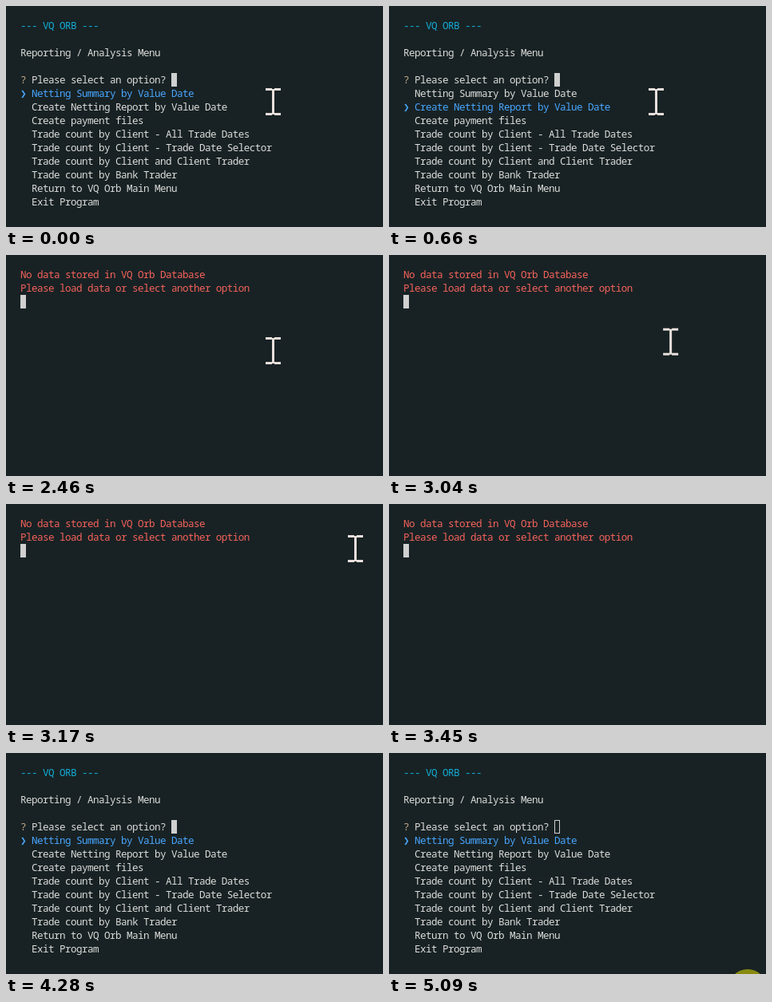
Recreate the animation shown at these times as an HTML page. Size 472 by 277 pixels, loop 5.17 s.

```html
<!DOCTYPE html>
<html lang="en">
<head>
<meta charset="utf-8">
<title>Terminal menu</title>
<style>
  html, body { margin: 0; width: 100%; height: 100%; overflow: hidden; background: #182224; }
  svg { display: block; width: 472px; height: 277px; }
  text {
    font: 500 12.6px "Noto Sans Mono", "DejaVu Sans Mono", monospace;
    letter-spacing: -0.56px; fill: #dcdcda; white-space: pre;
  }
  .head { fill: #13aed8; }
  .error { fill: #f5625c; }
  .active { fill: #48a6ff; }
  .mark { fill: #c6aa8c; }
</style>
</head>
<body>
<svg id="stage" viewBox="0 0 472 277">
  <rect width="472" height="277" fill="#182224"/>
  <g id="header"></g>
  <g id="menu"></g>
  <g id="errors"></g>
  <rect id="caret" width="7" height="17"/>
  <circle id="click" cx="449" cy="295" r="24" fill="#888a10"/>
  <path id="mouse" fill="#e8dfdc"
    d="M-9.5 -17h8v1h3v-1h8v3h-8v28h8v3h-8v-1h-3v1h-8v-3h8v-28h-8z"/>
</svg>
<script>
const LOOP = 5170, LEFT = 18, TOP = 16, CHAR = 7, LINE = 17;
const $ = id => document.getElementById(id);
const show = (el, on) => { el.style.display = on ? '' : 'none'; };

function write(parent, row, col, str, cls = '') {
  const el = document.createElementNS('http://www.w3.org/2000/svg', 'text');
  el.setAttribute('x', LEFT + col * CHAR);
  el.setAttribute('y', TOP + row * LINE + 13);
  el.setAttribute('class', cls);
  el.textContent = str;
  return parent.appendChild(el);
}

write($('header'), 0, 0, '--- VQ ORB ---', 'head');
write($('header'), 2, 0, 'Reporting / Analysis Menu');

write($('menu'), 4, 0, '?', 'mark');
write($('menu'), 4, 2, 'Please select an option?');
const options = [
  'Netting Summary by Value Date',
  'Create Netting Report by Value Date',
  'Create payment files',
  'Trade count by Client - All Trade Dates',
  'Trade count by Client - Trade Date Selector',
  'Trade count by Client and Client Trader',
  'Trade count by Bank Trader',
  'Return to VQ Orb Main Menu',
  'Exit Program'
].map((label, i) => write($('menu'), 5 + i, 2, label));
const pointers = [0, 1].map(i => write($('menu'), 5 + i, 0, '❯', 'active'));

write($('errors'), 0, 0, 'No data stored in VQ Orb Database', 'error');
write($('errors'), 1, 0, 'Please load data or select another option', 'error');

// start, header, menu, errors, selected option, caret column, caret row
const scenes = [
  [0,    1, 1, 0, 0, 27, 4],
  [660,  1, 1, 0, 1, 27, 4],
  [1340, 0, 0, 0, 0, 0, 0],
  [2460, 0, 0, 1, 0, 0, 2],
  [4240, 1, 0, 0, 0, 0, 4],
  [4280, 1, 1, 0, 0, 27, 4]
];

// time, x, y, easing power toward this point
const path = [
  [2980, 334.5, 120, 1],
  [3170, 437.5, 56, 1.3],
  [3210, 439, 49, 1],
  [3450, 431, 296, 1.6]
];

function mouseAt(t) {
  if (t < 2990) return path[0].slice(1, 3);
  t = 2990 + Math.floor((t - 2990) / 20) * 20;
  const i = Math.max(1, path.findIndex(p => p[0] > t));
  const [t0, x0, y0] = path[i - 1], [t1, x1, y1, power] = path[i];
  const k = Math.pow((t - t0) / (t1 - t0), power);
  return [x0 + (x1 - x0) * k, y0 + (y1 - y0) * k];
}

function drawCaret(col, row, hollow) {
  const inset = hollow ? 0.5 : 0, caret = $('caret');
  const attrs = {
    x: LEFT + col * CHAR + inset, y: TOP + row * LINE + inset,
    width: 7 - 2 * inset, height: 17 - 2 * inset,
    fill: hollow ? 'none' : '#cfd0cf', stroke: hollow ? '#cfd0cf' : 'none'
  };
  for (const name in attrs) caret.setAttribute(name, attrs[name]);
}

function draw(t) {
  const [, header, menu, errors, selected, col, row] = scenes.filter(s => s[0] <= t).pop();
  show($('header'), header);
  show($('menu'), menu);
  show($('errors'), errors);
  options.forEach((el, i) => el.setAttribute('class', i === selected ? 'active' : ''));
  pointers.forEach((el, i) => show(el, i === selected));
  drawCaret(col, row, t >= 5090);
  show($('click'), t >= 5050);
  show($('mouse'), t < 3450);
  if (t < 3450) $('mouse').setAttribute('transform', `translate(${mouseAt(t)})`);
}

const start = performance.now();
function tick() {
  draw((performance.now() - start) % LOOP);
  requestAnimationFrame(tick);
}
tick();
</script>
</body>
</html>
```
